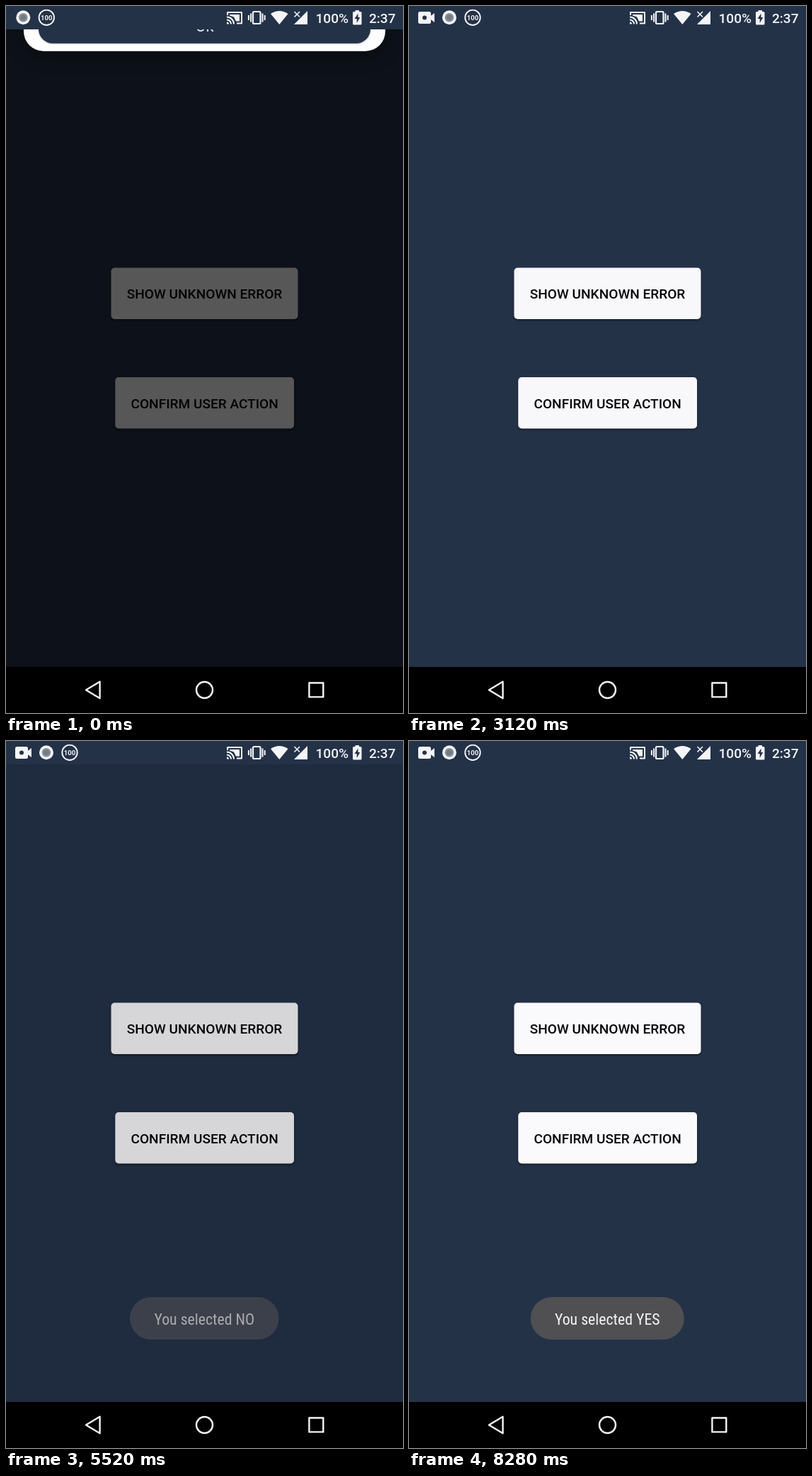
Recreate the animation shown at these times as an HTML page with a canvas. Size 561 px wide and 998 px high, loop 9.28 s.

```html
<!DOCTYPE html>
<html lang="en">
<head>
<meta charset="utf-8">
<title>Dialog demo</title>
<style>
  html, body { margin: 0; width: 100%; height: 100%; overflow: hidden; background: #000; }
  canvas { display: block; width: 100%; height: 100%; }
</style>
</head>
<body>
<canvas id="stage" width="561" height="998"></canvas>
<script>
const ctx = document.getElementById('stage').getContext('2d');
const W = 561, H = 998, BAR = 33, NAV = 933;
const LOOP = 9280, STEP = 40;
const NAVY = '#243248', LIGHT = '#f4f5f7';
const ROBOTO = 'Roboto, sans-serif';
const CONDENSED = '"Roboto Condensed", Roboto, sans-serif';
const MESSAGE = '600 21.6px "Open Sans", sans-serif';

const CLOSE_SLIDE = 200, FADE_START = 112, FADE_END = 300;
const OPEN_SLIDE = 490, OPEN_LEAD = 190;

const alertBox = {
  lines: ['An unknown error has occurred,', 'please try again later'],
  buttons: [{ x: 46, w: 469, label: 'Ok' }]
};
const confirmBox = {
  lines: ['Are you sure you want to do the', 'selected action?'],
  buttons: [{ x: 46, w: 227.5, label: 'No' }, { x: 287.5, w: 227.5, label: 'Yes' }]
};
const sessions = [
  { box: alertBox, open: -2000, close: -111.2 },
  { box: alertBox, open: 1600, close: 2822.4 },
  { box: confirmBox, open: 3840, close: 5262.4 },
  { box: confirmBox, open: 6560, close: 7862.4 }
];

const clamp = v => Math.min(1, Math.max(0, v));
const ease = p => (1 - Math.cos(Math.PI * clamp(p))) / 2;

function roundRect(x, y, w, h, r, fill) {
  ctx.beginPath();
  ctx.roundRect(x, y, w, h, r);
  ctx.fillStyle = fill;
  ctx.fill();
}

function polygon(points, fill) {
  ctx.beginPath();
  points.forEach(([x, y]) => ctx.lineTo(x, y));
  ctx.closePath();
  if (fill) {
    ctx.fillStyle = fill;
    ctx.fill();
  }
}

function disc(x, y, r, fill) {
  ctx.beginPath();
  ctx.arc(x, y, r, 0, 7);
  ctx.fillStyle = fill;
  ctx.fill();
}

function ring(x, y, r, width) {
  ctx.beginPath();
  ctx.arc(x, y, r, 0, 7);
  stroke(width);
}

function stroke(width) {
  ctx.lineWidth = width;
  ctx.strokeStyle = LIGHT;
  ctx.stroke();
}

function text(str, x, y, font, fill, align = 'center') {
  ctx.font = font;
  ctx.textAlign = align;
  ctx.fillStyle = fill;
  ctx.fillText(str, x, y);
}

function withShadow(color, blur, dy, draw) {
  ctx.save();
  ctx.shadowColor = color;
  ctx.shadowBlur = blur;
  ctx.shadowOffsetY = dy;
  draw();
  ctx.restore();
}

function pageButton(x, y, w, label) {
  withShadow('rgba(0,0,0,.55)', 3, 1.5, () => roundRect(x, y, w, 72.5, 5, '#faf9fc'));
  text(label, x + w / 2, y + 43.5, '500 19.1px ' + ROBOTO, '#050507');
}

function drawPage() {
  ctx.fillStyle = NAVY;
  ctx.fillRect(0, 0, W, H);
  pageButton(148.5, 369.5, 264, 'SHOW UNKNOWN ERROR');
  pageButton(154.3, 524, 252.7, 'CONFIRM USER ACTION');
}

function drawDialog(box, dy) {
  ctx.save();
  ctx.translate(0, 341 + dy);
  withShadow('rgba(0,0,0,.35)', 24, 7, () => roundRect(25, 0.3, 511, 308.7, 28, '#fefefe'));
  disc(281, 72.5, 36, NAVY);
  box.lines.forEach((line, i) => text(line, 280.5, 183 + i * 25.5, MESSAGE, '#101012'));
  for (const b of box.buttons) {
    withShadow('rgba(0,0,0,.25)', 2, 1, () => roundRect(b.x, 249, b.w, 49, 20, NAVY));
    text(b.label, b.x + b.w / 2, 281.5, '21.8px ' + ROBOTO, '#eceef1');
  }
  ctx.restore();
}

function drawSession(s, t) {
  const since = t - s.close;
  if (t < s.open || since >= FADE_END) return;
  const fade = 1 - clamp((since - FADE_START) / (FADE_END - FADE_START));
  ctx.fillStyle = `rgba(0,0,0,${0.65 * fade})`;
  ctx.fillRect(0, 0, W, H);
  const shown = since > 0
    ? 1 - ease(since / CLOSE_SLIDE)
    : ease((t - s.open + OPEN_LEAD) / OPEN_SLIDE);
  if (shown > 0.35) drawDialog(s.box, -H * (1 - shown));
}

function drawToast(label, w, alpha) {
  if (alpha <= 0) return;
  ctx.save();
  ctx.globalAlpha = alpha;
  roundRect(280.3 - w / 2, 785, w, 60, 30, 'rgba(83,82,83,.95)');
  ctx.fontStretch = 'condensed';
  text(label, 280.3, 823.7, '21.8px ' + CONDENSED, '#f4f4f4');
  ctx.restore();
}

function drawCamera() {
  roundRect(13, 8, 18, 17, 2.5, LIGHT);
  polygon([[30, 14.5], [36, 10], [36, 23], [30, 18.5]], LIGHT);
  disc(22, 16.5, 3, NAVY);
}

function drawRecorder(x) {
  disc(x, 16.3, 10, LIGHT);
  disc(x, 16.3, 6.3, '#8a919c');
  disc(x, 16.3, 4, '#737b87');
  ring(x + 33, 16.3, 10.7, 1.9);
  text('100', x + 33, 19.9, 'bold 9.6px ' + ROBOTO, LIGHT);
}

function drawCast() {
  ctx.beginPath();
  [[313, 13], [313, 9], [333, 9], [333, 24.5], [326, 24.5]].forEach(([x, y]) => ctx.lineTo(x, y));
  stroke(2);
  for (const r of [6, 10]) {
    ctx.beginPath();
    ctx.arc(312, 25.5, r, -Math.PI / 2, 0);
    stroke(2);
  }
  ctx.beginPath();
  ctx.moveTo(312, 25.5);
  ctx.arc(312, 25.5, 3, -Math.PI / 2, 0);
  ctx.fillStyle = LIGHT;
  ctx.fill();
  polygon([[316, 12], [330, 12], [330, 21.5], [325, 21.5], [322, 15.5], [316, 13.5]], LIGHT);
}

function drawVibrate() {
  ctx.beginPath();
  ctx.roundRect(349, 8, 10.5, 17, 1.5);
  stroke(2.2);
  ctx.fillStyle = LIGHT;
  for (const side of [-1, 1]) {
    ctx.fillRect(354.3 + side * 8.2 - 1, 10.5, 2, 12);
    ctx.fillRect(354.3 + side * 11.4 - 1, 13, 2, 7);
  }
}

function drawSignals() {
  ctx.beginPath();
  ctx.moveTo(386.3, 26);
  ctx.lineTo(374, 11);
  ctx.quadraticCurveTo(386.3, 3, 398.6, 11);
  ctx.closePath();
  ctx.fillStyle = LIGHT;
  ctx.fill();

  polygon([[426, 7], [426, 26], [407, 26]], LIGHT);
  ctx.beginPath();
  ctx.moveTo(407.5, 8);
  ctx.lineTo(415, 15.5);
  ctx.moveTo(415, 8);
  ctx.lineTo(407.5, 15.5);
  stroke(1.6);
}

function drawBattery() {
  roundRect(490, 8, 12.5, 18.5, 1.5, LIGHT);
  ctx.fillRect(493.5, 6, 5.5, 3);
  polygon([[497.5, 10.5], [492.5, 18], [495.7, 18], [495.7, 24], [500.3, 16], [497.5, 16]], NAVY);
}

function drawStatusBar(recording) {
  ctx.fillStyle = NAVY;
  ctx.fillRect(0, 0, W, BAR);
  if (recording) drawCamera();
  drawRecorder(recording ? 57 : 24.3);
  drawCast();
  drawVibrate();
  drawSignals();
  drawBattery();
  const font = '500 19.1px ' + ROBOTO;
  text('100%', 437.5, 23.8, font, LIGHT, 'left');
  text('2:37', 550.5, 23.8, font, LIGHT, 'right');
}

function drawNavBar() {
  ctx.fillStyle = '#000';
  ctx.fillRect(0, NAV, W, H - NAV);
  ctx.lineJoin = 'round';
  polygon([[113, 965.5], [132.6, 953.8], [132.6, 977.2]]);
  stroke(2.4);
  ring(280.5, 965.5, 11.5, 2.4);
  ctx.beginPath();
  ctx.rect(428.4, 955.5, 19.9, 19.9);
  stroke(2.4);
}

function render(t) {
  drawPage();
  sessions.forEach(s => drawSession(s, t));
  const noAlpha = t < 7360 ? (t - 5280) / 400 : 1 - (t - 7340) / 380;
  drawToast('You selected NO', 210.5, clamp(noAlpha));
  drawToast('You selected YES', 217, clamp((t - 7880) / 400));
  drawStatusBar(t >= 240);
  drawNavBar();
}

const start = performance.now();
function tick() {
  const t = (performance.now() - start) % LOOP;
  render(Math.floor(t / STEP) * STEP);
  requestAnimationFrame(tick);
}
tick();
</script>
</body>
</html>
```
